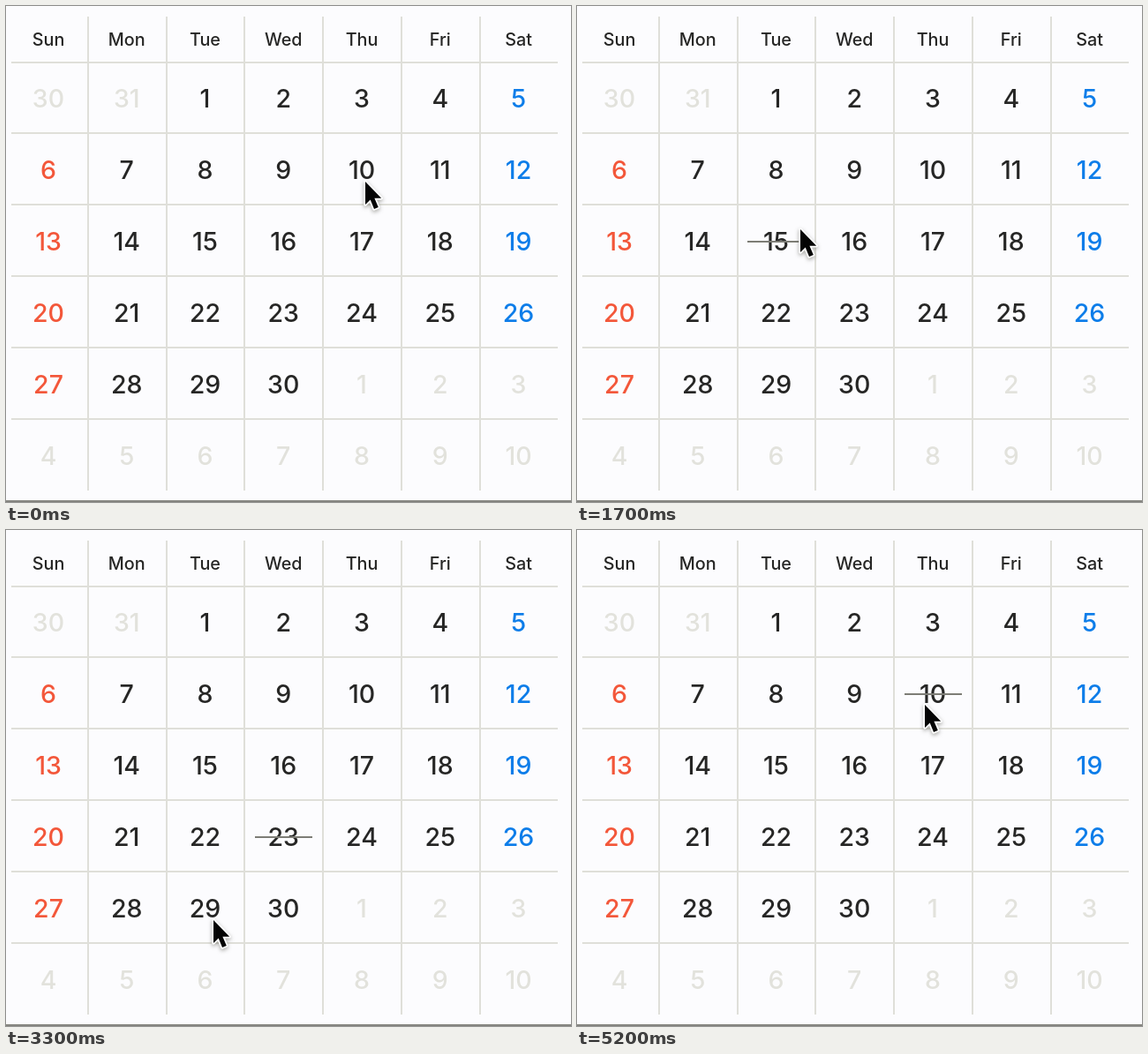
Recreate the animation shown at these times as an HTML page with a canvas. Size 640x562 px, loop 5300 ms.

```html
<!DOCTYPE html>
<html lang="en">
<head>
<meta charset="utf-8">
<title>Calendar</title>
<style>
html, body { margin: 0; width: 100%; height: 100%; overflow: hidden; background: #fcfcfe; }
canvas { display: block; }
</style>
</head>
<body>
<canvas id="stage" width="640" height="562"></canvas>
<script>
const ctx = document.getElementById('stage').getContext('2d');
const LOOP = 5300, STEP = 100, BEAT = 215, HOVER_DELAY = 240;
const CELL_W = 88.75, CELL_H = 81;
const DAYS = ['Sun', 'Mon', 'Tue', 'Wed', 'Thu', 'Fri', 'Sat'];
const PAPER = '#fcfcfe', LINE = '#dfdfd9', INK = '#262625', FADED = '#e2e2dc';
const RED = '#f3573a', BLUE = '#0d7de9';

// The pointer rests on each spot for some beats, then moves on within one beat.
const SPOTS = [
  { x: 407, y: 198, beats: 5 },
  { x: 253, y: 252, beats: 4 },
  { x: 262, y: 207, beats: 3 },
  { x: 307, y: 270, beats: 2 },
  { x: 300, y: 352, beats: 1 },
  { x: 235, y: 441, beats: 3 },
  { x: 243, y: 348, beats: 2 },
  { x: 409, y: 202, beats: 4 },
  { x: 394, y: 197, beats: 2 }
];
const path = SPOTS.flatMap(spot => Array(spot.beats).fill(spot));

const colX = col => 48 + CELL_W * col;
const rowY = row => 105 + CELL_H * row;
const mix = (a, b, u) => a + (b - a) * u;
const smooth = u => u * u * (3 - 2 * u);

function pointerAt(t) {
  const beat = Math.floor(t / BEAT), u = smooth(t / BEAT - beat);
  const from = path[beat], to = path[beat + 1];
  return { x: mix(from.x, to.x, u), y: mix(from.y, to.y, u) };
}

function rect(x, y, w, h, color) {
  ctx.fillStyle = color;
  ctx.fillRect(x, y, w, h);
}

function label(text, x, baseline, font, color) {
  ctx.font = `${font} Inter, sans-serif`;
  ctx.fillStyle = color;
  ctx.fillText(text, x, baseline);
}

function dayColor(index) {
  if (index < 2 || index > 31) return FADED;
  return { 0: RED, 6: BLUE }[index % 7] || INK;
}

function drawCalendar() {
  rect(0, 0, 640, 562, PAPER);
  for (let row = 0; row < 6; row++) rect(6, Math.floor(63 + 80.9 * row), 619, 2, LINE);
  for (let col = 1; col < 7; col++) rect(Math.floor(3.5 + CELL_W * col), 12, 2, 537, LINE);
  rect(0, 560, 640, 2, '#858580');

  ctx.textAlign = 'center';
  DAYS.forEach((day, col) => label(day, colX(col), 44.5, '550 19.8px', INK));
  for (let i = 0; i < 42; i++) {
    const date = i < 2 ? 30 + i : (i - 2) % 30 + 1;
    label(date, colX(i % 7), rowY(Math.floor(i / 7)) + 10, '500 28.5px', dayColor(i));
  }
}

function drawStrike({ x, y }) {
  const col = Math.floor((x - 4) / CELL_W), row = Math.floor((y - 64) / CELL_H);
  rect(Math.round(colX(col) - 32.5), rowY(row) - 1, 65, 2, '#7d7d76');
}

function drawPointer({ x, y }) {
  const arrow = new Path2D('M0 0V26L5.7 20.5L10 31L14.8 29L10.4 18.7H18.2Z');
  ctx.save();
  ctx.translate(x, y + 1);
  ctx.lineJoin = 'round';
  ctx.shadowColor = 'rgba(90,90,80,.5)';
  ctx.shadowBlur = 4;
  ctx.shadowOffsetY = 2;
  ctx.strokeStyle = '#fff';
  ctx.lineWidth = 3.5;
  ctx.stroke(arrow);
  ctx.shadowColor = 'transparent';
  ctx.fillStyle = '#050505';
  ctx.fill(arrow);
  ctx.restore();
}

function frame() {
  const t = Math.floor(performance.now() % LOOP / STEP) * STEP;
  drawCalendar();
  if (t >= HOVER_DELAY) drawStrike(pointerAt(t - HOVER_DELAY));
  drawPointer(pointerAt(t));
  requestAnimationFrame(frame);
}
frame();
</script>
</body>
</html>
```
